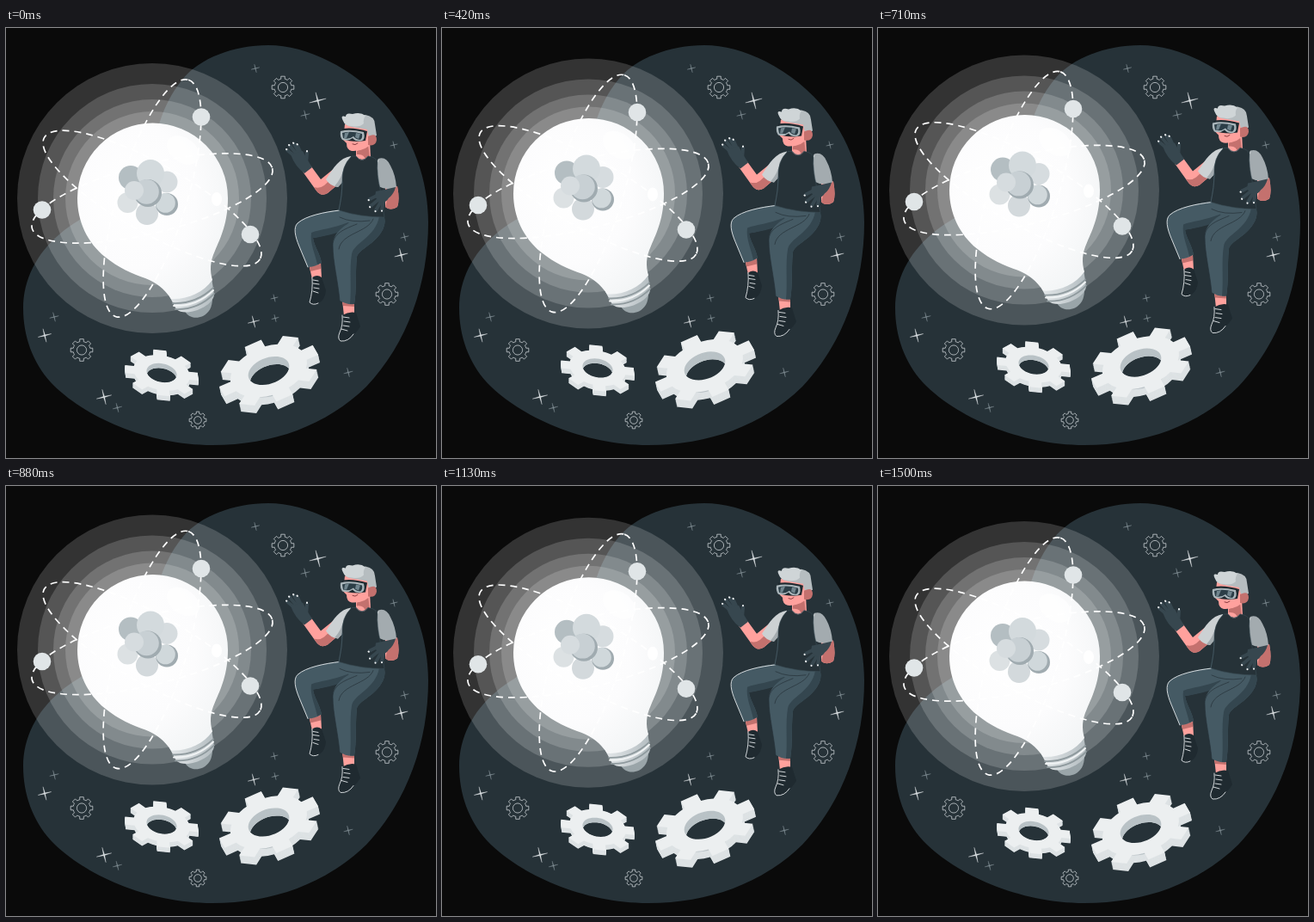
Animation of 500x500 px, one loop 1.54 s. Source, as an HTML page:

```html
<!DOCTYPE html>
<html lang="en">
<head>
<meta charset="utf-8">
<title>Floating ideas</title>
<style>
  html, body { margin: 0; width: 100%; height: 100%; overflow: hidden; background: #0a0a0a; }
  svg { display: block; width: 100vw; height: 100vh; }
  .line { fill: none; stroke-linecap: round; stroke-linejoin: round; }
  .skin { fill: #ffa19d; }
  .shade { fill: #c4716e; }
  .cloth { fill: #455a64; }
  .fold { fill: #34464f; }
  .dark { fill: #1f2a30; }
  .glove { fill: #37474f; }
  .edge { stroke: #e6eaec; stroke-width: .9; }
  .tip { stroke: #f2f4f5; stroke-width: 2; }
  .finger { stroke: #37474f; stroke-width: 4; }
</style>
</head>
<body>
<svg viewBox="0 0 500 500">
  <defs>
    <radialGradient id="glass" cx=".38" cy=".42" r=".68">
      <stop offset="0" stop-color="#fff"/>
      <stop offset=".6" stop-color="#fcfcfd"/>
      <stop offset="1" stop-color="#f3f5f6"/>
    </radialGradient>
    <linearGradient id="metal">
      <stop offset="0" stop-color="#e3e7e9"/>
      <stop offset="1" stop-color="#b4bdc1"/>
    </linearGradient>
  </defs>

  <path fill="#263238" d="M305 20C350 20 404 47 440 88C474 128 491 177 491 226C491 297 467 366 419 417C373 462 310 485 240 485C165 485 90 452 52 412C31 389 20 358 20 326C20 292 36 262 62 240C95 212 154 192 168 147C176 121 180 91 205 60C225 35 265 20 305 20Z"/>
  <g id="sky"></g>

  <g id="float">
    <g id="glow" fill="#fff" fill-opacity=".17"></g>

    <g id="base">
      <path fill="#9aa5a9" d="M208 329L240 314C240 325 236 331 229 335C220 339 211 336 208 329Z"/>
      <path fill="url(#metal)" d="M190 312L239 290L242 310C241 324 209 337 198 327Z"/>
      <path class="line" stroke="#8f9a9e" stroke-width="1.8" d="M194 320Q221 321 241 302M197 327Q223 328 242 309"/>
      <path class="line" stroke="#f0f3f4" stroke-width="2" d="M195 323Q222 324 241 305"/>
    </g>
    <path fill="url(#glass)" d="M83 198A87.5 87.5 0 0 1 258 198C258 226 250 243 243 259C237 272 237 282 240 293C229 308 211 316 192 315C184 303 175 296 162 291C147 286 131 279 115 266C95 250 83 225 83 198Z"/>
    <g fill="#fff">
      <ellipse cx="206" cy="142" rx="21" ry="14" transform="rotate(35 206 142)" opacity=".7"/>
      <ellipse cx="245" cy="199" rx="6" ry="8"/>
    </g>
    <g id="orbits" fill="none" stroke="#fff" stroke-width="1.7" stroke-dasharray="8 6"></g>
    <g id="nucleus"></g>
    <g id="electrons" fill="#e0e5e7"></g>
    <g id="gears"></g>

    <g id="person">
      <!-- far leg -->
      <path class="skin" d="M352 274L366 272L367 291L356 292Z"/>
      <path class="shade" d="M353 278L366 274L366 280L354 283Z"/>
      <path class="dark" d="M356 290Q362 286 367 290L372 305Q371 315 365 319Q358 324 353 319Q356 306 356 290Z"/>
      <path class="line edge" d="M356 290Q357 306 353 319Q357 323 363 320M357 293l6 1M357 297l7 1M358 302l6 1M357 306l6 2"/>
      <path class="cloth" d="M391 211C372 213 349 218 339 227C334 232 336 242 341 254L351 278Q359 278 367 273C365 262 358 253 357 244C370 242 386 238 402 230L416 216Z"/>
      <path class="fold" d="M398 226C381 233 365 234 355 238C353 250 360 264 362 275L367 273C365 262 358 253 357 244C373 242 390 238 402 230Z"/>
      <path class="line edge" d="M388 212C371 214 349 218 339 227C334 232 336 242 341 254L351 278"/>

      <!-- near leg -->
      <path class="skin" d="M391 316L405 317L405 332L393 335Z"/>
      <path class="shade" d="M391 319L405 319L405 324L392 323Z"/>
      <path class="dark" d="M391 334Q399 329 407 331L412 347Q408 354 404 356Q398 365 389 364Q385 361 388 354Q391 345 391 334Z"/>
      <path class="line edge" d="M391 334Q392 346 388 354Q385 361 389 364Q398 365 404 356M392 336l7 1M393 341l7 1M392 346l7 1M390 350l7 2"/>
      <path class="cloth" d="M388 211L440 220Q442 229 436 238C427 252 411 257 408 266C406 285 408 304 405 321Q396 322 388 317C386 294 380 272 380 253C380 239 391 232 401 225Q390 221 388 211Z"/>
      <path class="fold" d="M440 220Q442 229 436 238C427 252 411 257 408 266C406 285 408 304 405 321L400 321C402 302 399 281 402 263C404 250 430 243 434 219Z"/>
      <path class="line" stroke="#263238" stroke-width=".7" d="M427 222C421 238 390 238 387 257M388 220Q402 227 423 224M408 228C393 234 380 239 380 253C380 272 386 294 388 317"/>

      <!-- arms -->
      <path class="skin" d="M382 163L393 176L374 192Q366 197 360 188L345 167L355 161L366 176Z"/>
      <path class="shade" d="M391 177L374 192Q366 197 360 188L358 185Q365 187 370 183L383 171Z"/>
      <path fill="#ccd1d3" d="M401 149C388 151 381 162 372 176Q377 184 386 185L396 174Z"/>
      <path fill="#a3abaf" d="M386 185L396 174L393 163Q390 175 382 184Z"/>
      <path class="line finger" d="M338 151L327 142M340 149L330 137M343 148L335 135M345 150L339 137M349 158L350 145"/>
      <path class="glove" d="M331 147L345 143Q350 153 356 162L347 169Q336 161 331 147Z"/>
      <path class="line tip" d="M326 141l.3.2M329 136l.3.3M334 133.500l.3.4M338.500 135l.3.4M350 143.500v-.4"/>
      <path class="skin" d="M441 183L455 184Q458 200 455 208Q447 213 441 208Z"/>
      <path class="shade" d="M441 183L455 184Q458 200 455 208Q447 213 441 208L443 200Q449 196 447 187Z"/>
      <path fill="#a3abaf" d="M433 152Q442 149 447 160Q453 171 454 185Q444 190 433 184Q429 162 433 152Z"/>
      <path class="line" stroke="#ccd1d3" stroke-width="1" d="M433 153Q430 163 433 183"/>

      <!-- head -->
      <path class="skin" d="M407 136L423 131L424 151Q417 159 407 151Z"/>
      <path class="shade" d="M408 143Q417 140 421 134L423 151L418 154Q417 146 408 147Z"/>
      <path class="skin" d="M394 112L422 110L427 132Q418 144 402 143Q396 142 396 134L392 130Z"/>
      <path fill="#b6bdc0" d="M393 106L418 101Q429 103 429 112L431 125L425 128Q421 127 420 118L402 115Q393 114 393 106Z"/>
      <path fill="#cfd5d7" d="M392 108Q388 101 395 103Q395 98 403 100Q412 97 418 102Q415 106 416 111Q411 116 402 114Q394 114 392 108Z"/>
      <path class="shade" d="M421 126Q431 121 431 130Q430 138 421 136Z"/>
      <path class="line" stroke="#8d3f42" stroke-width="1" d="M403 135Q406 137 409 134"/>
      <path class="dark" d="M391 117Q404 115 420 120L418 131L410 132Q398 132 391 129Z"/>
      <path fill="#aab6bb" d="M389 120Q399 117 416 121Q418 129 414 131Q407 133 403 128Q398 132 391 130Q388 126 389 120Z"/>
      <path fill="#2c3e47" d="M391 122Q401 119 414 123Q415 128 412 130Q407 130 404 126Q399 130 392 128Z"/>
      <path fill="#71858e" d="M394 122L399 121L396 128L393 128ZM407 122L412 123L410 129L406 127Z"/>

      <!-- vest -->
      <path fill="#263238" stroke="#3c4e57" stroke-width=".6" d="M402 149L407 149Q414 158 421 149Q430 150 432 156Q431 170 435 187L440 220Q412 220 387 212Q391 194 391 179Q390 160 402 149Z"/>
      <path class="line" stroke="#4a5e68" stroke-width=".7" d="M407 149Q414 158 421 149M391 179Q391 194 387 212"/>

      <!-- near hand -->
      <path class="line finger" d="M433 194L423 199M435 198L424 207M437 200L430 212M439 201L437 211"/>
      <path class="glove" d="M430 190Q440 188 453 185Q451 193 445 198Q441 204 435 202L429 197Z"/>
      <path class="line tip" d="M421.500 200l.3.2M423 208l.2.3M429.500 213v.3M437 212.500v.3"/>
    </g>
  </g>
</svg>
<script>
  const byId = id => document.getElementById(id);
  const STEPS = 37, LOOP = 1540, LIFT = 10;

  function add(parent, tag, attrs) {
    const node = document.createElementNS('http://www.w3.org/2000/svg', tag);
    for (const key in attrs) node.setAttribute(key, attrs[key]);
    return byId(parent).appendChild(node);
  }
  const circle = (parent, cx, cy, r, attrs) => add(parent, 'circle', { cx, cy, r, ...attrs });

  // Closed path through polar points, mapped by m = [ax, ay, bx, by, x, y].
  const polar = (points, [ax, ay, bx, by, x, y]) => 'M' + points.map(([deg, r]) => {
    const c = r * Math.cos(deg * Math.PI / 180), s = r * Math.sin(deg * Math.PI / 180);
    return [(ax * c + bx * s + x).toFixed(2), (ay * c + by * s + y).toFixed(2)];
  }).join('L') + 'Z';

  const cog = (root, tip) => Array.from({ length: 8 }, (_, i) => i * 45).flatMap(a =>
    [[a - 13, root], [a - 10, tip], [a + 10, tip], [a + 13, root], [a + 22.5, root]]);
  const ring = r => Array.from({ length: 40 }, (_, i) => [i * 9, r]);

  function solidGear(map, dx, dy) {
    const at = k => [...map.slice(0, 4), map[4] + dx * k, map[5] + dy * k];
    const layer = (k, inner, outer, fill) => add('gears', 'path', {
      d: outer + polar(ring(inner), at(k)), fill, 'fill-rule': 'evenodd'
    });
    const steps = Array.from({ length: 10 }, (_, i) => 1 - i / 10);
    for (const k of steps) layer(k, .45, polar(cog(.84, 1.1), at(k)), '#dde2e4');
    for (const k of steps) layer(k, .45, polar(ring(.6), at(k)), '#b9c2c6');
    layer(0, .45, polar(cog(.84, 1.1), at(0)), '#eceff0');
  }

  function outlineGear(x, y, r) {
    const style = { fill: 'none', stroke: '#c9d0d3', 'stroke-width': .8 };
    add('sky', 'path', { d: polar(cog(.77, 1), [0, -r, r, 0, x, y]), ...style });
    circle('sky', x, y, r * .43, style);
  }

  function star(x, y, r, fill) {
    const spikes = [0, 90, 180, 270].flatMap(a => [[a, r], [a + 45, r * .1]]);
    const d = polar(spikes, [0, -1, 1, 0, 0, 0]);
    add('sky', 'path', {
      d, transform: `translate(${x} ${y}) rotate(-14)`, fill, stroke: fill, 'stroke-width': .3
    });
  }

  [[322, 69, 13], [88, 374.5, 13], [443, 309.5, 13], [223, 456, 10]].forEach(g => outlineGear(...g));
  [[362.5, 84.5, 10], [45, 357.5, 8], [114, 429, 9], [288, 341.5, 7], [459.5, 264, 8]]
    .forEach(s => star(...s, '#dfe4e6'));
  [[290, 47, 5], [348, 101, 5.5], [451, 136, 4.5], [463.5, 243, 5], [312, 314, 4.5],
   [313, 337.5, 4.5], [56, 336, 5.5], [129.5, 441.5, 5.5], [398, 400.5, 5.5]]
    .forEach(s => star(...s, '#829096'));

  [157, 133, 115, 101].forEach(r => circle('glow', 170, 198, r));

  // x, y, radius, colour, optional shadow
  [[145, 174, 14, '#b4bec2'], [187, 179, 12.5, '#d6dcdf'], [141.500, 203, 12, '#dce1e3'],
   [164, 216, 13, '#d3d9dc'], [187, 205, 13, '#d0d8db', 1], [168, 169, 16, '#d3dadd'],
   [165, 192, 16, '#c8d0d4', 1], [149, 189, 11, '#d6dcdf']].forEach(([x, y, r, fill, shadow]) => {
    if (shadow) circle('nucleus', x, y, r, { fill: '#a0abb0' });
    const inset = shadow ? 1.6 : 0;
    circle('nucleus', x - inset, y - inset, r - inset, { fill });
  });

  [-73, 29.4, -14].forEach(a => add('orbits', 'ellipse',
    { rx: 144, ry: 40, transform: `translate(170 198) rotate(${a})` }));
  [[227, 103.5], [42, 211.5], [284, 240]].forEach(([x, y]) => circle('electrons', x, y, 10.3));

  solidGear([-2, -24.5, 39, 4, 181, 401], 0, 5.5);
  solidGear([23.5, -36.5, 47.5, 5, 305.5, 398.5], 2, 9);

  function draw() {
    const step = Math.floor((performance.now() % LOOP + 5) / LOOP * STEPS) % STEPS;
    const phase = (step / (STEPS - 1) + .02) % 1;
    const rise = LIFT * (1 - Math.abs(1 - 2 * phase));
    byId('float').setAttribute('transform', `translate(0 ${(.4 - rise).toFixed(3)})`);
    requestAnimationFrame(draw);
  }
  draw();
</script>
</body>
</html>
```
